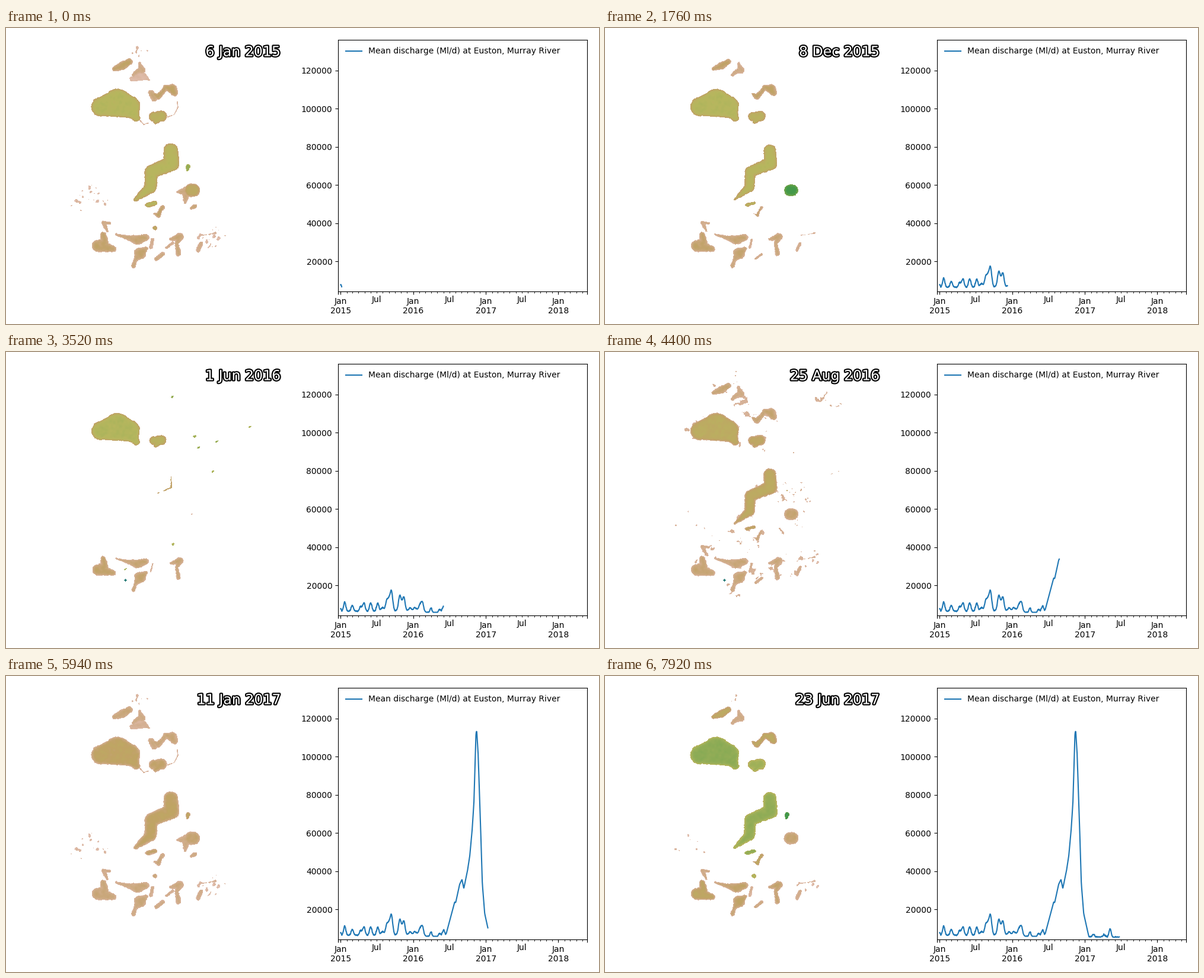
These frames come from a looping animation (1000 by 500 pixels, 8000 ms). A matplotlib script:

```python
import numpy as np
import matplotlib
import matplotlib.pyplot as plt
from matplotlib.animation import FuncAnimation
from matplotlib.patheffects import withStroke

STEP_MS, TICK_MS, LOOP_MS = 220, 40, 8000
STEPS = LOOP_MS // STEP_MS + 1
X0, X1, Y0, Y1 = 100, 475, 20, 480     # map area in stage pixels

# seasons: water index of a deep lake and dryness of the land at key steps
KEYS = (0, 5, 12, 16, 23, 27, 36)
INDEX = (.70, .65, .76, .69, .79, .78, .61)
DRYNESS = (0, .4, .65, 1, 0, .02, .3)
SILT = .83                             # index of shallow, muddy water

rng = np.random.default_rng(7)
yy, xx = np.mgrid[Y0:Y1, X0:X1] + 0.5
earth = matplotlib.colormaps["gist_earth"]


# ---------- wetland map ----------
def noise(scale):
    """Smooth random field with unit spread."""
    h, w = xx.shape
    fy, fx = np.fft.fftfreq(h)[:, None], np.fft.rfftfreq(w)[None]
    soft = np.exp(-2 * (np.pi * scale) ** 2 * (fx ** 2 + fy ** 2))
    n = np.fft.irfft2(np.fft.rfft2(rng.standard_normal((h, w))) * soft, s=(h, w))
    return n / n.std()


fine, mid, broad = noise(0.8), noise(1.7), noise(3.5)


def chain_depth(chain):
    """Depth inside a chain of circles (x, y, r) joined by tapering links."""
    best = np.full(xx.shape, -1e9)
    for (ax, ay, ar), (bx, by, br) in zip(chain, chain[1:] or chain):
        dx, dy = bx - ax, by - ay
        t = ((xx - ax) * dx + (yy - ay) * dy) / (dx * dx + dy * dy + 1e-9)
        t = np.clip(t, 0, 1)
        gap = np.hypot(xx - ax - t * dx, yy - ay - t * dy)
        best = np.maximum(best, ar + t * (br - ar) - gap)
    return best


def ellipses(*shapes):
    return np.max([1 - np.hypot((xx - cx) / rx, (yy - cy) / ry) ** 2
                   for cx, cy, rx, ry in shapes], axis=0)


def muddy(clarity):
    """Index that follows the season more closely the clearer the lake is."""
    return lambda step: SILT + clarity * (np.interp(step, KEYS, INDEX) - SILT)


def bloom(step):
    """A round lake that turns deep green late in the first year."""
    return .80 - .37 * np.exp(-((step - 7) / 5) ** 2)


lakes = []
shore = np.full(xx.shape, -1e9)


def lake(tone, hold, shrink, *chain):
    """A lake lasting until dryness passes `hold`, its shore retreating by `shrink`."""
    depth = chain_depth(chain) + 0.4
    np.maximum(shore, depth, out=shore)
    rows, cols = np.where(depth > -3)
    win = np.s_[rows.min():rows.max() + 1, cols.min():cols.max() + 1]
    lakes.append((win, (depth + .25 * fine + .2 * mid)[win], tone, hold, shrink))


ALWAYS, LONG, SHORT, BRIEF, WET = 1.1, .8, .5, .35, .12

# northern lakes
lake(muddy(1.05), ALWAYS, .6, (160, 133, 16), (188, 127, 24), (207, 133, 19), (220, 152, 6))
lake(muddy(.4), LONG, 2, (183, 69, 4), (196, 64, 7), (208, 57, 5.5))
lake(muddy(0), SHORT, 0, (215, 79, 3), (222, 73, 4), (229, 71, 6), (225, 60, 2))
lake(muddy(-.4), WET, 0, (213, 86, 4), (232, 82, 6), (240, 87, 2))
lake(muddy(.4), LONG, .5, (250, 112, 3), (256, 116, 5), (265, 107, 4), (269, 100, 4),
     (280, 103, 8), (284, 109, 6))
lake(muddy(.1), WET, 0, (245, 110, 5), (250, 119, 5))
lake(muddy(.9), ALWAYS, 1, (249, 150, 8), (262, 149, 9), (252, 158, 4))
lake(muddy(-.3), WET, 0, (226, 156, .6), (232, 163, .3), (241, 160, .3))
lake(muddy(-.3), WET, 0, (271, 151, .6), (284, 146, .3), (290, 134, .5), (289, 124, .4))
# central lakes
lake(muddy(1), LONG, 4, (278, 207, 12), (279, 229, 13), (245, 243, 11), (244, 269, 10),
     (218, 290, 3))
lake(bloom, LONG, 3, (312, 274, 11), (316, 274, 11))
lake(muddy(.1), WET, 0, (290, 277, 2), (304, 276, 8), (302, 295, 2))
lake(muddy(2), BRIEF, 0, (307, 234, 3.5), (306, 240, 1.5))
lake(muddy(1.2), LONG, 3, (239, 299, 3.5), (251, 296, 4))
lake(muddy(.5), LONG, 3, (264, 303, 3.5), (260, 309, 3), (257, 316, 4), (251, 314, 1.5))
lake(muddy(.9), BRIEF, 0, (251, 338, 3.5))
lake(muddy(.3), WET, 0, (313, 304, 2.5), (319, 301, 3.5))
# southern lakes
lake(muddy(.1), LONG, 1, (175, 330, 2), (164, 329, 3), (168, 336, 3), (171, 343, 1.5))
lake(muddy(.3), ALWAYS, .7, (164, 349, 5), (166, 362, 7), (155, 368, 10), (180, 373, 5.5))
lake(muddy(.2), ALWAYS, .7, (186, 349, 1.5), (204, 354, 3.5), (222, 358, 8), (235, 354, 6))
lake(muddy(.2), ALWAYS, .5, (236, 373, 3.5), (226, 381, 10), (218, 392, 3), (215, 402, 3.5))
lake(muddy(-.1), ALWAYS, 2, (247, 358, 3), (244, 371, 2.5))
lake(muddy(.1), SHORT, 3, (264, 382, 3.5), (254, 390, 3.5))
lake(muddy(.2), ALWAYS, .7, (278, 357, 2.5), (293, 353, 6.5), (288, 364, 3), (291, 381, 4))
lake(muddy(0), WET, 0, (281, 363, 2), (271, 371, 2))
lake(muddy(0), SHORT, 2, (329, 364, 3.5), (324, 375, 3.5))
lake(muddy(-.2), SHORT, .5, (330, 350, .5), (341, 349, .5), (354, 346, 1.2))

# land that floods: halos round the lakes, the river and some low ground
river = chain_depth([(310, 226, 1), (365, 212, 1), (430, 189, 1), (471, 183, 1)])
lowland = ellipses((385, 24, 38, 9), (376, 85, 28, 50), (456, 160, 14, 14),
                   (225, 110, 16, 60), (272, 135, 28, 40), (305, 245, 42, 60),
                   (310, 300, 48, 28), (205, 312, 40, 26), (340, 358, 30, 20))
plain = np.max([np.minimum(1 + shore / 11, 1), lowland, np.minimum(river / 3 + .5, .7)], axis=0)
flooding = plain + .5 * broad + .35 * mid + .15 * fine - .62
marsh = .9 * ellipses((118, 290, 18, 24), (150, 282, 18, 26), (345, 355, 30, 16),
                      (228, 45, 18, 16)) + .7 * mid

# little pools left after autumn rain, and one dark pond
pools = [(280, 76), (410, 127), (355, 152), (325, 161), (318, 143), (348, 202),
         (281, 325), (201, 367)]
rain = np.max([chain_depth([(x, y, 1.6), (x + 2, y - 1, 1)]) for x, y in pools], axis=0)
pond = chain_depth([(201.5, 385.5, 2.2)])


def wetland(step):
    v = np.full(xx.shape, 2.0)
    dry = np.interp(step, KEYS, DRYNESS)
    flood = np.interp(step, (18, 21, 23, 24, 27), (0, .35, 1, 1, 0))
    moist = np.clip(1 - 2 * dry, 0, 1) * (1 - flood)
    if flood:
        tone = np.clip(.935 - .05 * flooding + .012 * fine, .865, .95)
        v = np.where(flooding > 1.6 * (1 - flood), tone, v)
    if moist:
        v = np.where(marsh > 2.1 - .7 * moist, .89 + .012 * fine, v)
    for win, depth, tone_at, hold, shrink in lakes:
        tone = tone_at(step)
        d = depth - shrink * dry - 40 * max(0, dry - hold)
        rim = max(tone, min(tone + .13, .885))
        shade = tone + (rim - tone) * np.exp(-np.maximum(d, 0) / 2.2)
        shade = shade + .006 * mid[win]
        v[win] = np.where(d > 0, np.minimum(v[win], shade), v[win])
    if 15 <= step <= 18:
        v = np.where(rain + .4 * fine > 0, .66 + .03 * mid, v)
    if 15 <= step <= 24:
        v = np.where(pond > 0, .29, v)
    rgba = earth(np.clip(v, 0, 1), bytes=True)
    rgba[..., 3] = np.where(v > 1, 0, 255)
    return rgba


maps = [wetland(s) for s in range(STEPS)]

# ---------- discharge in thousand Ml/d ----------
# low flow with short releases (day, height), then one great flood
RELEASES = [(20, 4.9), (58, 3), (101, 2.4), (117, 4.4), (151, 4.4), (187, 4.2),
            (211, 1.9), (232, 5.2), (244, 5.5), (256, 10), (296, 6.2), (304, 3.4),
            (318, 7), (349, 1.6), (374, 1.7), (398, 2.8), (411, 4.8), (455, 3),
            (497, 2), (518, 2.8), (774, 1.4), (828, 1.4), (858, 4.3)]
FLOOD = [(528, 6), (554, 16.1), (574, 24), (579, 23.6), (599, 33.2), (611, 35.8),
         (620, 31), (638, 40), (650, 48), (662, 61.7), (671, 76), (681, 112),
         (685, 113.7), (692, 102), (704, 65), (713, 34), (725, 18), (741, 10.4), (752, 5.5)]
days = np.arange(906)
flow = np.interp(days, (0, 6, 400, 470, 530, 740, 905), (7.8, 6.4, 7, 4.6, 6.8, 5.6, 5.4))
for day, height in RELEASES:
    flow += height * np.exp(-((days - day) / 6) ** 2 / 2)
flow += .3 * rng.standard_normal(days.size)
flow = np.maximum(flow, np.interp(days, *zip(*FLOOD)))
flow = 1000 * np.convolve(np.pad(flow, 1, mode="edge"), (.25, .5, .25), "valid")

last_day = np.rint(np.interp(
    range(STEPS), (0, 5, 10, 12, 15, 16, 20, 23, 25, 27, 30, 35, 36),
    (5, 294, 372, 404, 501, 517, 602, 684, 725, 741, 802, 899, 904))).astype(int)
EPOCH = np.datetime64("2015-01-01")


def date_text(day):
    d = (EPOCH + int(day)).item()
    return f"{d.day} {d:%b} {d.year}"


# ---------- stage ----------
plt.rcParams.update({"font.family": "DejaVu Sans", "text.kerning_factor": 6})
fig = plt.figure(figsize=(10, 5), dpi=100, facecolor="white")

stage = fig.add_axes([0, 0, 1, 1])
stage.axis("off")
picture = stage.imshow(maps[0], extent=(X0, X1, Y1, Y0), aspect="auto",
                       interpolation="nearest")
stage.set(xlim=(0, 1000), ylim=(500, 0))
label = stage.text(463, 47.5, "", ha="right", va="baseline", size=17, color="white",
                   path_effects=[withStroke(linewidth=3, foreground="black")])

chart = fig.add_axes([0.56, 0.11, 0.42, 0.85])
curve, = chart.plot([], [], color="#1f77b4", lw=1.5,
                    label="Mean discharge (Ml/d) at Euston, Murray River")
left, right = -13, 1241
chart.set(xlim=(left, right), ylim=(4340, 136120))
chart.set_yticks(range(20000, 120001, 20000))
months = np.arange("2015-01", "2018-06", dtype="datetime64[M]")
starts = (months.astype("datetime64[D]") - EPOCH).astype(int)
chart.set_xticks([left, *starts[::12], right],
                 ["", *(f"Jan\n{y}" for y in range(2015, 2019)), ""])
chart.set_xticks(starts, ["Jul" if i % 12 == 6 else "" for i in range(len(starts))],
                 minor=True)
chart.legend(loc="upper left", frameon=False)


def draw(i):
    step = min((i * TICK_MS + TICK_MS // 2) // STEP_MS, STEPS - 1)
    day = last_day[step]
    picture.set_data(maps[step])
    label.set_text(date_text(day))
    curve.set_data(days[:day + 1], flow[:day + 1])
    return picture, label, curve


anim = FuncAnimation(fig, draw, frames=LOOP_MS // TICK_MS, interval=TICK_MS,
                     repeat=True, repeat_delay=0, blit=False)
plt.show()
```
